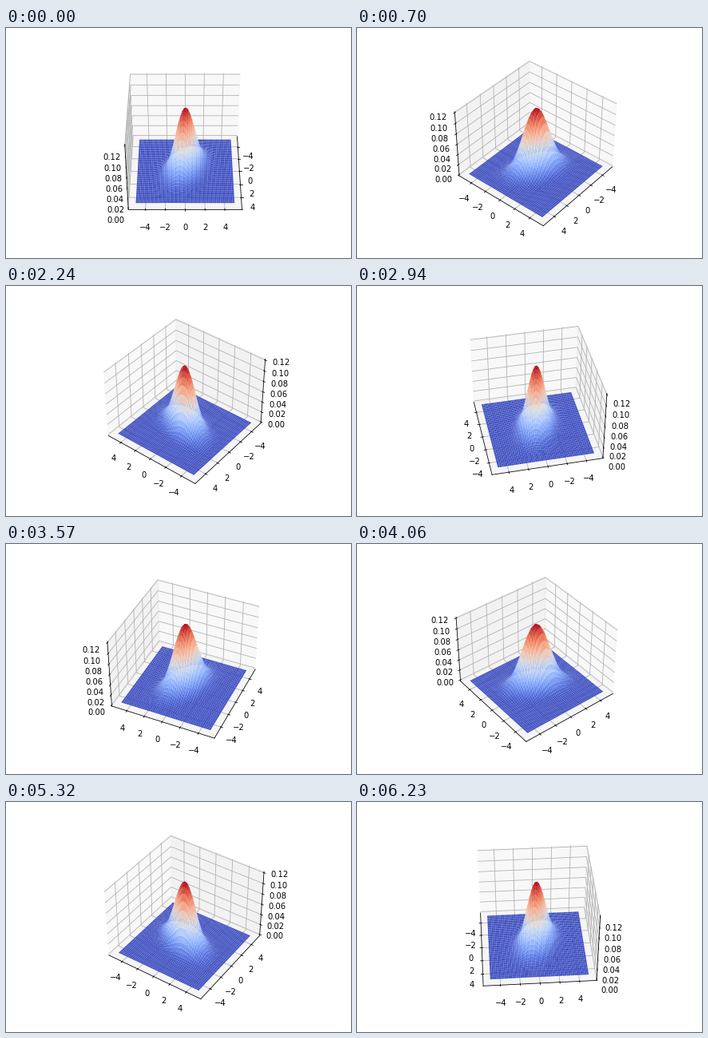
These frames come from a looping animation (432x288 px, 6300 ms). A matplotlib script:

```python
import numpy as np
import matplotlib.pyplot as plt
from matplotlib.animation import FuncAnimation

FRAMES = 90
STEP = 360 / FRAMES
ELEV = 40
NUDGE = 1e-6  # keeps the side pane well defined when seen head-on

plt.rcParams.update({"font.family": "DejaVu Sans", "font.size": 10})


def gaussian(x, y, cov):
    """Density of a centred bivariate normal distribution."""
    inv = np.linalg.inv(cov)
    q = inv[0, 0] * x**2 + 2 * inv[0, 1] * x * y + inv[1, 1] * y**2
    return np.exp(-q / 2) / (2 * np.pi * np.sqrt(np.linalg.det(cov)))


fig = plt.figure(figsize=(6, 4), dpi=72, facecolor="white")
fig.subplots_adjust(left=0.125, right=0.9, bottom=0.125, top=0.88)
ax = fig.add_subplot(projection="3d")

side = np.linspace(-5, 5, 50)
x, y = np.meshgrid(side, side)
z = gaussian(x, y, np.array([[2, -0.5], [-0.5, 1]]))
ax.plot_surface(x, y, z, cmap="coolwarm", rstride=1, cstride=1,
                linewidth=0, antialiased=True)

edge = 5.5 * 25 / 24
peak = z.max()
ax.set_xlim(-edge, edge)
ax.set_ylim(-edge, edge)
ax.set_zlim(-peak / 48, peak * 49 / 48)
ax.set_xticks(range(-4, 5, 2))
ax.set_yticks(range(-4, 5, 2))
ax.set_zticks(np.arange(7) * 0.02)


def turn(i):
    ax.view_init(elev=ELEV, azim=STEP * i + NUDGE)
    return []


anim = FuncAnimation(fig, turn, frames=FRAMES, interval=70,
                     init_func=lambda: turn(0), repeat=True, repeat_delay=0)
plt.show()
```
